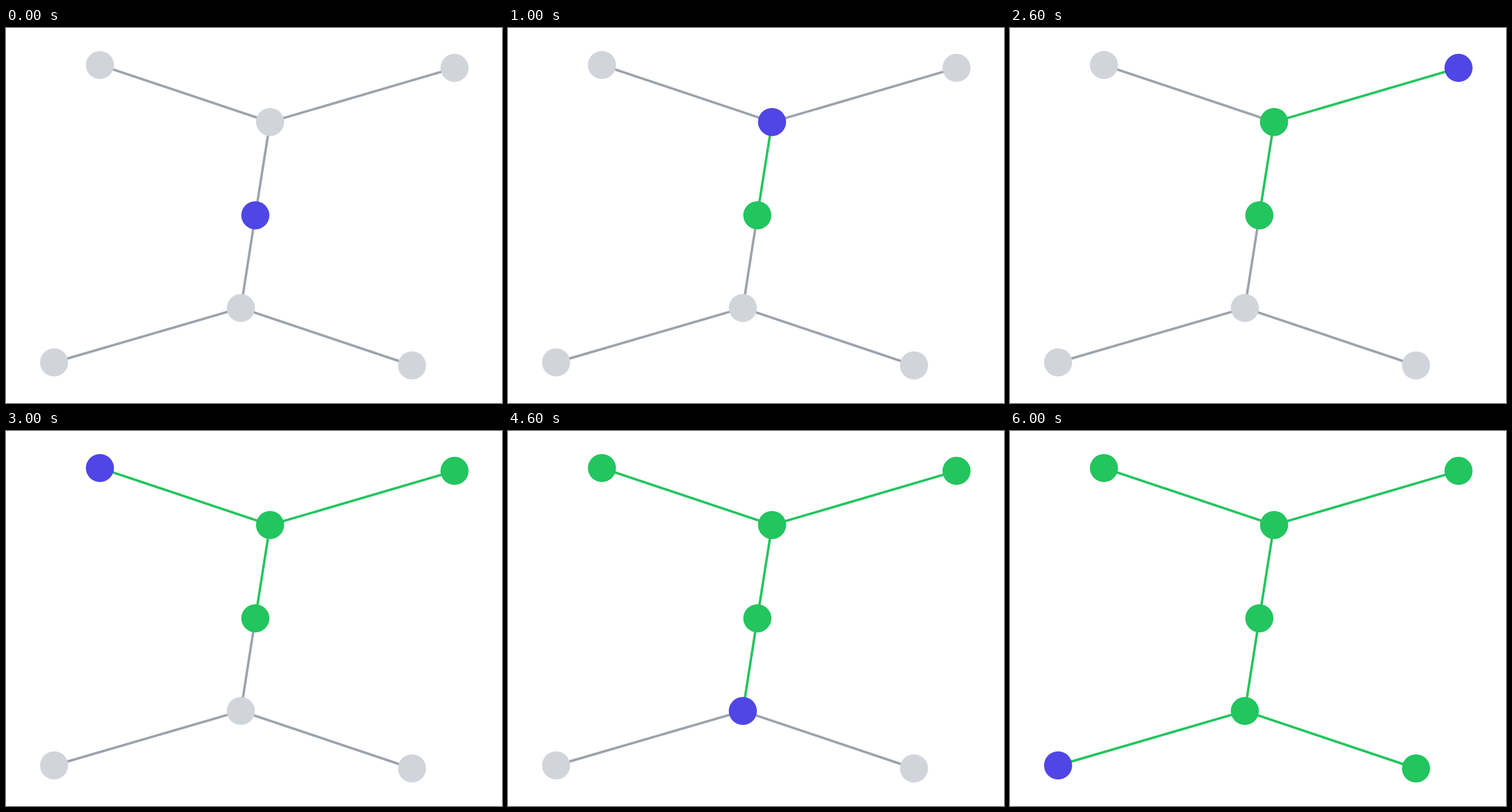
Recreate the animation shown at these times as an HTML page. Size 819 px wide and 619 px high, loop 7000 ms.

```html
<!DOCTYPE html>
<html lang="en">
<head>
<meta charset="utf-8">
<title>Depth-first traversal</title>
<style>
  :root { --idle: #d1d5db; --edge: #9ca3af; --now: #4f46e5; --done: #22c55e; }
  html, body { margin: 0; width: 100%; height: 100%; overflow: hidden; background: #fff; }
  svg { display: block; width: 819px; height: 619px; }
  line { stroke: var(--edge); stroke-width: 4; }
  circle { fill: var(--idle); stroke-width: 0; r: 23.2px; }
  line, circle { animation: 7s step-end infinite; }

  /* Step n: node becomes current and its edge is marked, then the node is done. */
  .s0 { animation-name: visit0; }
  .s1 { animation-name: visit1; }
  .s2 { animation-name: visit2; }
  .s3 { animation-name: visit3; }
  .s4 { animation-name: visit4; }
  .s5 { animation-name: visit5; }
  .s6 { animation-name: visit6; }

  @keyframes visit0 {
    0% { fill: var(--now); }
    14.2857%, 100% { fill: var(--done); }
  }
  @keyframes visit1 {
    0% { fill: var(--idle); stroke: var(--edge); }
    14.2857% { fill: var(--now); stroke: var(--done); }
    28.5714%, 100% { fill: var(--done); stroke: var(--done); }
  }
  @keyframes visit2 {
    0% { fill: var(--idle); stroke: var(--edge); }
    28.5714% { fill: var(--now); stroke: var(--done); }
    42.8571%, 100% { fill: var(--done); stroke: var(--done); }
  }
  @keyframes visit3 {
    0% { fill: var(--idle); stroke: var(--edge); }
    42.8571% { fill: var(--now); stroke: var(--done); }
    57.1428%, 100% { fill: var(--done); stroke: var(--done); }
  }
  @keyframes visit4 {
    0% { fill: var(--idle); stroke: var(--edge); }
    57.1428% { fill: var(--now); stroke: var(--done); }
    71.4285%, 100% { fill: var(--done); stroke: var(--done); }
  }
  @keyframes visit5 {
    0% { fill: var(--idle); stroke: var(--edge); }
    71.4285% { fill: var(--now); stroke: var(--done); }
    85.7142%, 100% { fill: var(--done); stroke: var(--done); }
  }
  @keyframes visit6 {
    0% { fill: var(--idle); stroke: var(--edge); }
    85.7142%, 100% { fill: var(--now); stroke: var(--done); }
  }
</style>
</head>
<body>
<svg viewBox="0 0 819 619">
  <line class="s1" x1="411.7" y1="309.2" x2="436" y2="155.2"/>
  <line class="s2" x1="436" y1="155.2" x2="740.6" y2="65.8"/>
  <line class="s3" x1="436" y1="155.2" x2="155.1" y2="61.1"/>
  <line class="s4" x1="411.7" y1="309.2" x2="387.8" y2="462.1"/>
  <line class="s5" x1="387.8" y1="462.1" x2="670.4" y2="557"/>
  <line class="s6" x1="387.8" y1="462.1" x2="79.4" y2="552"/>

  <circle class="s0" cx="411.7" cy="309.2" r="23.2"/>
  <circle class="s1" cx="436" cy="155.2" r="23.2"/>
  <circle class="s2" cx="740.6" cy="65.8" r="23.2"/>
  <circle class="s3" cx="155.1" cy="61.1" r="23.2"/>
  <circle class="s4" cx="387.8" cy="462.1" r="23.2"/>
  <circle class="s5" cx="670.4" cy="557" r="23.2"/>
  <circle class="s6" cx="79.4" cy="552" r="23.2"/>
</svg>
</body>
</html>
```
